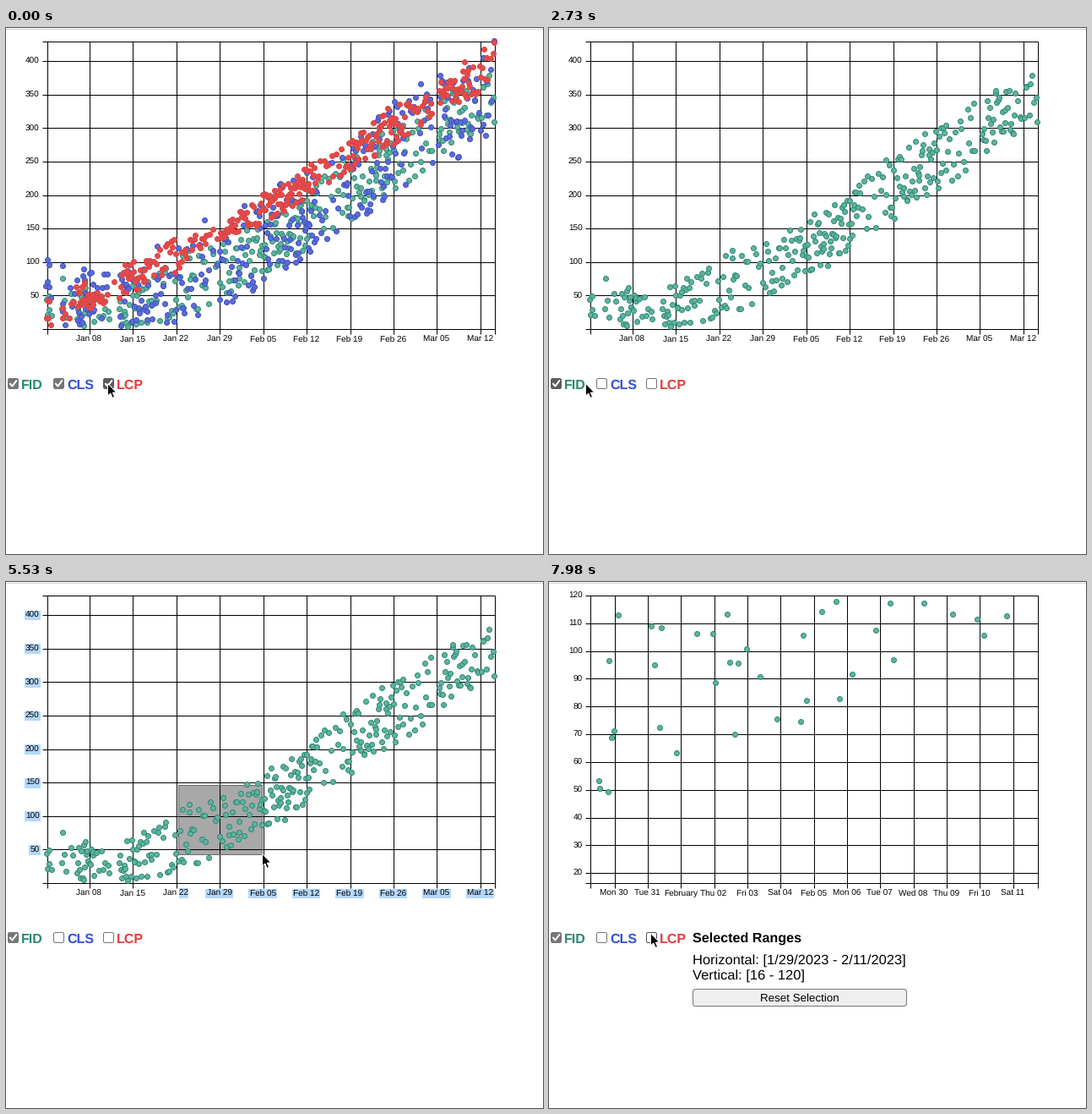
Recreate the animation shown at these times as a matplotlib script. Size 636 px wide and 622 px high, loop 8 s.

```python
import numpy as np
import matplotlib.pyplot as plt
from matplotlib.animation import FuncAnimation
from matplotlib.patches import FancyBboxPatch, Polygon, Rectangle

W, H, LOOP, STEP, TICK = 636, 622, 8000, 40, 70
plt.rcParams.update({"toolbar": "None", "font.family": "Liberation Sans",
                     "text.hinting": "none"})
GREEN, BLUE, RED = "#2a8a73", "#3350d8", "#e63c3c"
HILITE = "#b3d7ff"
LEFT, RIGHT, TOP, BOTTOM = 48.5, 578.5, 15.5, 355.5

fig = plt.figure(figsize=(W / 72, H / 72), dpi=72, facecolor="white")
ax = fig.add_axes([0, 0, 1, 1])
ax.set(xlim=(0, W), ylim=(H, 0))
ax.axis("off")


def text(x, y, s, size, color="black", ha="left", weight="normal"):
    return ax.text(x, y, s, fontsize=size, color=color, ha=ha, weight=weight,
                   va="baseline", zorder=5)


def box(x, y, w, h, fc, ec, r=2, z=5):
    style = f"round,pad=0,rounding_size={r}"
    return ax.add_patch(FancyBboxPatch((x, y), w, h, boxstyle=style, fc=fc,
                                       ec=ec, lw=1, zorder=z))


def show(artists, on):
    for a in artists:
        a.set_visible(on)


# ---- axes and grid ----

class Grid:
    """Grid lines and tick labels of one view."""

    def __init__(self, xticks, yticks):
        xs = [LEFT, RIGHT] + [np.floor(x) + 0.5 for x, _ in xticks]
        ys = [TOP, BOTTOM] + [np.floor(y) + 0.5 for y, _ in yticks]
        self.lines = [
            ax.vlines(xs, TOP, BOTTOM + 6, color="black", lw=1, zorder=1),
            ax.hlines(ys, LEFT - 6, RIGHT, color="black", lw=1, zorder=1)]
        self.xlab = [text(x, 371, s, 10, ha="center") for x, s in xticks]
        self.ylab = [text(39.5, y + 3.6, s, 10, ha="right") for y, s in yticks]
        self.labels = self.xlab + self.ylab
        for lab in self.labels:
            lab.set_bbox(dict(fc=HILITE, ec="none", pad=1.2))

    def show(self, on):
        show(self.lines + self.labels, on)

    def select(self, chosen):
        for lab in self.labels:
            lab.get_bbox_patch().set_visible(lab in chosen)


weeks = ["Jan 08", "Jan 15", "Jan 22", "Jan 29", "Feb 05", "Feb 12",
         "Feb 19", "Feb 26", "Mar 05", "Mar 12"]
days = ["Mon 30", "Tue 31", "February", "Thu 02", "Fri 03", "Sat 04",
        "Feb 05", "Mon 06", "Tue 07", "Wed 08", "Thu 09", "Fri 10", "Sat 11"]
full = Grid([(98.3 + 51.45 * i, s) for i, s in enumerate(weeks)],
            [(355.5 - 0.7923 * v, str(v)) for v in range(50, 401, 50)])
zoom = Grid([(77 + 39.35 * i, s) for i, s in enumerate(days)],
            [(15.5 + 3.283 * (120 - v), str(v)) for v in range(20, 121, 10)])
day22 = ax.add_patch(Rectangle((204.5, 361.5), 11.5, 12, fc=HILITE, zorder=4))
ax.plot([0, W], [0.5, 0.5], color="#d4d4d4", lw=1)

# ---- scatter data ----

# right edge of each x slot and its share of the points
slots = [(47, 0), (54, 8), (65, 0), (69, 3), (84, 7), (104, 30), (122, 12),
         (134, 1), (170, 46), (200, 24), (236, 28), (253, 7), (304, 54),
         (326, 32), (367, 62), (402, 22), (434, 40), (470, 50), (506, 30),
         (512, 0), (553, 50), (577, 17)]
edges, share = np.array(slots, float).T
cdf = np.cumsum(share) / share.sum()
knots = [48, 120, 200, 260, 320, 400, 460, 520, 578]


def cloud(seed, n, top, low, extra):
    """Random points between two curves, plus a few fixed ones."""
    rng = np.random.default_rng(seed)
    x = np.interp((np.arange(n) + rng.random(n)) / n, cdf, edges)
    hi, lo = np.interp(x, knots, top), np.interp(x, knots, low)
    pts = np.column_stack([x, hi + (lo - hi) * rng.random(n)])
    return np.vstack([pts, extra])


def dots(pts, face, edge, z):
    x, y = np.transpose(pts)
    return ax.scatter(x, y, s=36, fc=face, ec=edge, lw=1, zorder=z)


fid = cloud(4, 318,
            [302, 316, 278, 250, 216, 158, 112, 80, 58],
            [354, 354, 352, 316, 288, 232, 190, 156, 112],
            [(67, 296), (94, 307), (134, 332), (209, 269), (217, 263),
             (235, 276), (242, 260), (298, 238), (376, 237), (399, 156),
             (529, 74), (578, 111), (572, 56)])
cls = cloud(11, 330,
            [275, 290, 252, 220, 186, 142, 86, 56, 36],
            [354, 354, 354, 330, 295, 238, 198, 165, 126],
            [(49, 274), (67, 281), (179, 258), (235, 227), (491, 66),
             (514, 56), (565, 35), (578, 15)])
lcp = cloud(23, 335,
            [318, 290, 249, 228, 184, 138, 88, 58, 26],
            [354, 328, 290, 250, 225, 176, 138, 100, 66],
            [(199, 250), (543, 40), (566, 25), (578, 17)])
near = [(59, 235), (60, 244), (70, 248), (74, 184), (77, 176), (71, 93),
        (82, 39), (121, 52), (125, 98), (131, 172), (133, 54), (151, 202),
        (175, 61), (194, 61), (197, 119), (211, 38), (214, 95), (220, 180),
        (224, 96), (234, 79), (250, 112), (270, 162), (298, 165), (301, 63),
        (305, 140), (323, 35), (340, 23), (344, 138), (359, 109), (387, 57),
        (404, 25), (408, 92), (444, 25), (478, 38), (507, 44), (515, 63),
        (542, 40)]

TEAL = ("#5fb39f", "#2f8b75")
fid_dots = dots(fid, *TEAL, 3)
cls_dots = dots(cls, "#5b6cda", "#3f50c0", 3.1)
lcp_dots = dots(lcp, "#e34b4b", "#de4343", 3.2)
near_dots = dots(np.add(near, 0.4), *TEAL, 3)

# ---- controls ----


class Check:
    def __init__(self, x, label, color):
        self.box = box(x + 0.5, 414.5, 12, 12, "white", "#767676")
        self.mark, = ax.plot([x + 3, x + 5.4, x + 10.2],
                             [420.8, 423.6, 417.2], color="white", lw=2,
                             zorder=6)
        text(x + 16, 427, label, 16, color, weight="bold")

    def set(self, on, hover, press):
        color = "#858585" if press else "#767676"
        if hover and not press:
            color = "#5c5c5c" if on else "#4f4f4f"
        self.box.set(facecolor=color if on else "white", edgecolor=color)
        self.mark.set_visible(on)


fid_check = Check(2, "FID", GREEN)
cls_check = Check(56, "CLS", BLUE)
lcp_check = Check(115, "LCP", RED)

panel = [
    text(170, 426, "Selected Ranges", 16.1, weight="bold"),
    text(170, 452, "Horizontal: [1/29/2023 - 2/11/2023]", 16.45),
    text(170, 470, "Vertical: [16 - 120]", 16.45),
    box(170.5, 481.5, 253, 20, "#efefef", "#767676", 3, 4),
    text(297, 496, "Reset Selection", 13.33, ha="center")]
badge = [box(290.5, 375.5, 26, 25, "#f8f8f8", "#c8c8c8", 3, 6),
         ax.add_patch(Rectangle((295, 379), 17, 17, fc="#5585e6", zorder=7))]

X0, Y0 = 204, 240
brush = ax.add_patch(Rectangle((X0, Y0), 0, 0, fc=(0, 0, 0, 0.34),
                               ec="#6a6a6a", lw=1, zorder=2))

# ---- pointer ----

arrow = np.array([(0, 0), (0, 14.5), (3.3, 11.5), (5.7, 16.9), (8.1, 15.9),
                  (5.8, 10.6), (10.3, 10.4)])
pointer = ax.add_patch(Polygon(arrow, fc="black", ec="white", lw=1, zorder=10))
# time, x, y
path = np.array([
    (840, 120, 420), (1050, 110, 422), (1190, 110, 422), (1400, 100, 420),
    (2030, 63, 421), (2240, 63, 421), (2520, 43, 420), (2730, 43, 420),
    (3010, 1, 421), (3150, 1, 421), (3290, 5, 419), (3570, 5, 419),
    (4410, 203, 239), (4480, 204, 240), (4900, 261, 292), (5250, 302, 319),
    (5320, 307, 322), (5460, 303, 321), (6020, 303, 321), (6230, 324, 342),
    (6650, 155, 422), (6860, 131, 482), (7000, 125, 482), (7070, 125, 482),
    (7350, 120, 417), (7490, 120, 417), (7700, 120, 415)], float)


def selection(t, x):
    """Labels caught by the text selection while dragging."""
    if 5110 <= t < 5250 or t >= 5460:
        return full.xlab[3:] + full.ylab
    return full.xlab[3:4] if x > 235 else []


def draw(i):
    t = (i * STEP + STEP // 2) // TICK * TICK
    x, y = (np.interp(t, path[:, 0], path[:, k]) for k in (1, 2))
    pointer.set_xy(arrow + (x + 0.5, y + 0.5))

    zoomed = t >= 5810
    dragging = 4480 <= t < 5810
    full.show(not zoomed)
    zoom.show(zoomed)
    full.select(selection(t, x) if dragging else [])
    zoom.select(zoom.labels if t < 7140 else [])
    day22.set_visible(dragging and t > 4480)

    lcp_on, cls_on = t < 630, t < 2310
    fid_dots.set_visible(not zoomed)
    near_dots.set_visible(zoomed)
    cls_dots.set_visible(cls_on)
    lcp_dots.set_visible(lcp_on)
    fid_check.set(True, 2310 <= t < 3640, False)
    cls_check.set(cls_on, 1260 <= t < 2310, 2100 <= t < 2310)
    lcp_check.set(lcp_on, t < 1260 or t >= 6650,
                  70 <= t < 630 or 7840 <= t < 7980)

    show(panel, zoomed)
    show(badge, 5950 <= t < 7140)
    brush.set_visible(dragging)
    brush.set(width=max(x - X0, 0), height=max(y - Y0 + 1, 0))
    return []


anim = FuncAnimation(fig, draw, frames=LOOP // STEP, interval=STEP,
                     repeat=True, repeat_delay=0)
plt.show()
```
